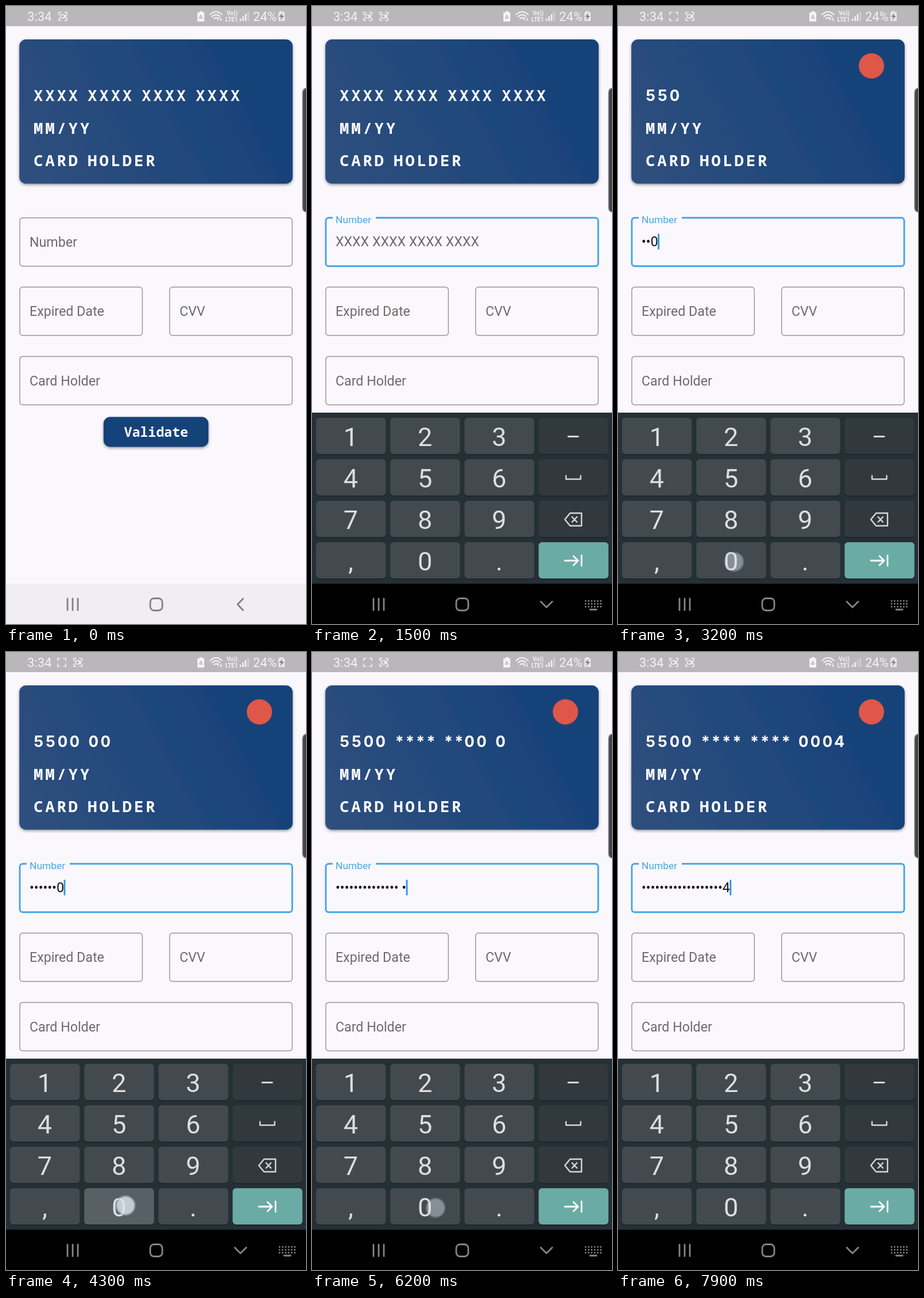
An HTML page that plays this animation: 522 by 1073 pixels, repeating every 8 s.

```html
<!DOCTYPE html>
<html lang="en">
<head>
<meta charset="utf-8">
<title>Card form</title>
<style>
  html, body { margin: 0; width: 100%; height: 100%; overflow: hidden; background: #faf8fc; }
  svg { display: block; width: 100vw; height: 100vh; }
  text { font-family: Roboto, sans-serif; font-size: 23.2px; white-space: pre; }
  .line { fill: none; stroke-linecap: round; stroke-linejoin: round; }
  .card { font: 700 27.5px "Noto Sans Mono", monospace; letter-spacing: 3.7px; word-spacing: -7px; fill: #fff; }
  .digits { font: 700 27px Inter, sans-serif; font-variant-numeric: tabular-nums; letter-spacing: 3.4px; word-spacing: 1.5px; }
  .star { letter-spacing: .8px; }
  .button { font: 700 23.2px "Noto Sans Mono", monospace; fill: #fff; }
  .status text { font-size: 22px; fill: #f3f2f4; }
  .box { fill: none; stroke: #969598; stroke-width: 1.45; }
  .hint { fill: #6b6a6d; }
  .key { font-size: 45px; fill: #dcdee0; text-anchor: middle; }
</style>
</head>
<body>
<svg viewBox="0 0 522 1073" preserveAspectRatio="none">
  <defs>
    <linearGradient id="blue" gradientUnits="userSpaceOnUse" x1="60" y1="300" x2="400" y2="110">
      <stop stop-color="#2e4f7e"/><stop offset=".5" stop-color="#23497c"/><stop offset="1" stop-color="#18427a"/>
    </linearGradient>
    <filter id="shadow" x="-10%" y="-20%" width="120%" height="150%">
      <feDropShadow dx="0" dy="2" stdDeviation="2.5" flood-opacity=".4"/>
    </filter>
    <clipPath id="aboveNav"><path d="M0 0H522V1003H0z"/></clipPath>
    <path id="brackets" class="line" stroke-width="1.7" d="M1 5V1H5M11 1H15V5M15 11V15H11M5 15H1V11"/>
    <path id="lens" class="line" stroke-width="1.6" d="M4 5H10V11H4zM10 8L13 5.5V10.5z"/>
  </defs>

  <rect width="522" height="1073" fill="#faf8fc"/>
  <rect x="23.2" y="58" width="475.6" height="250.5" rx="11.6" fill="url(#blue)" filter="url(#shadow)"/>
  <circle id="brand" cx="441" cy="104" r="22" fill="#df5748"/>
  <text id="cardNumber" class="card" x="48" y="165"></text>
  <text class="card" x="48" y="221.5">MM/YY</text>
  <text class="card" x="48" y="278">CARD HOLDER</text>

  <rect id="numberBox" class="box" x="24" y="367.7" width="474" height="84" rx="5"/>
  <rect id="notch" x="36" y="364" height="8" fill="#faf8fc"/>
  <text id="label" x="41">Number</text>
  <text id="hint" class="hint" x="41" y="416.5">XXXX XXXX XXXX XXXX</text>
  <text id="entry" x="41" y="416.5" fill="#111"></text>
  <rect id="cursor" y="395.5" width="2.9" height="27" fill="#2f96e8"/>
  <rect class="box" x="24" y="488" width="213.3" height="84" rx="5"/>
  <rect class="box" x="284.7" y="488" width="213.3" height="84" rx="5"/>
  <rect class="box" x="24" y="608.4" width="474" height="84" rx="5"/>
  <text class="hint" x="41" y="538">Expired Date</text>
  <text class="hint" x="302" y="538">CVV</text>
  <text class="hint" x="41" y="658.5">Card Holder</text>
  <rect x="169.7" y="713.5" width="182.6" height="52" rx="11.6" fill="#18427a" filter="url(#shadow)"/>
  <text class="button" x="205.5" y="748">Validate</text>

  <g class="status">
    <rect width="522" height="35" fill="#b9b7ba"/>
    <text x="37" y="26">3:34</text>
    <text x="430" y="26">24%</text>
    <g stroke="#f3f2f4">
      <g id="recorder"><use href="#brackets"/><use id="blink" href="#lens"/></g>
      <g id="recorder2" transform="translate(117 10)"><use href="#brackets"/><use href="#lens"/></g>
      <path class="line" stroke-width="2" d="M355 15Q365.500 5 376 15M358.500 18.500Q365.500 12 372 18M362 22Q365 19 368 21.500"/>
      <path class="line" stroke-width="1.200" d="M369 25V20M367.500 21.500L369 20L370.500 21.500M374 20V25M372.500 23.500L374 25L375.500 23.500"/>
      <g stroke-width="2.600">
        <path d="M408 26V22M412.500 26V18"/><path id="bar" d="M417 26V14"/>
        <path d="M421.500 26V10" opacity=".4"/>
      </g>
    </g>
    <g fill="#f3f2f4">
      <path d="M337 9H342V11H345V27H333V11H337z"/>
      <path d="M476 9H482V11H485V26H474V11H476z" opacity=".8"/>
      <text x="384" y="16" style="font-size:10px;font-weight:700">Vo))</text>
      <text x="381.500" y="26.500" style="font-size:10px;font-weight:700">LTE1</text>
    </g>
    <path class="line" stroke="#b9b7ba" stroke-width="1.500" d="M336.500 21L339 16L341.500 21z"/>
    <path d="M481 12L475 19H479L477 25L484 17H480z" fill="#858388"/>
  </g>
  <path d="M523 142.500Q516 143 516 151V350Q516 357 523 358" fill="#444345" stroke="#929094" stroke-width="1.500"/>

  <g clip-path="url(#aboveNav)"><g id="keyboard">
    <rect y="706" width="522" height="297" fill="#253036"/>
    <g id="keys"></g>
    <g class="line" stroke="#d5d8da" stroke-width="2.400">
      <path d="M446 747.500H463" stroke-width="3"/>
      <path d="M442 815.500V821.500H467.500V815.500"/>
      <path d="M440 891.500L449 880.500H469V902.500H449zM452.500 887L461 896M461 887L452.500 896"/>
      <path d="M440 963H462M455 955L463 963L455 971M469 954V972" stroke="#fff" stroke-width="2.800"/>
    </g>
  </g></g>

  <rect id="nav" y="1003" width="522" height="70"/>
  <g id="navIcons" class="line" stroke-width="2.800">
    <path d="M107 1029V1049M116 1029V1049M125 1029V1049"/>
    <rect x="251" y="1028.500" width="21" height="21" rx="6.500"/>
    <path id="back" d="M412.500 1029L403 1039L412.500 1049"/>
    <g id="hide">
      <path d="M398 1034L408 1044L418 1034"/>
      <path d="M476 1033H503M476 1038H503M476 1043H503" stroke-dasharray=".1 5.200"/>
      <path d="M484 1048H495"/>
    </g>
  </g>
  <g id="touch">
    <circle r="18" fill="#9db9d5" opacity=".35"/>
    <circle r="15.500" fill="#e4e8ec" opacity=".72" stroke="#a8c0d8" stroke-width="1.500"/>
  </g>
</svg>
<script>
const LOOP = 8000, STEP = 100, FOCUS = 600;
const $ = id => document.getElementById(id);
const set = (id, attrs) => Object.entries(attrs).forEach(([k, v]) => $(id).setAttribute(k, v));
const show = (id, on) => set(id, { visibility: on ? 'visible' : 'hidden' });
const clamp = v => Math.max(0, Math.min(1, v));
const ease = v => 1 - (1 - clamp(v)) ** 3;
const mix = (a, b, p) => a + (b - a) * p;

const digits = '55' + '0'.repeat(13) + '4';
const typedAt = [2200, 2600, ...Array.from({ length: 13 }, (_, i) => 3200 + i * 300), 7600];

const caps = ['1', '2', '3', '', '4', '5', '6', '', '7', '8', '9', '', ',', '0', '.', ''];
const keyX = i => 7 + (i % 4) * 129.1;
const keyY = i => 715 + Math.floor(i / 4) * 72;
const keyColor = i => i === 15 ? '#6aaba5' : i % 4 === 3 ? '#31393f' : '#42494f';
$('keys').innerHTML = caps.map((cap, i) => {
  const x = keyX(i), y = keyY(i);
  return `<rect x="${x}" y="${y + 1.5}" width="121.5" height="63" rx="6" fill="#1a2328"/>
    <rect id="key${i}" x="${x}" y="${y}" width="121.5" height="63" rx="6"/>
    <text class="key" x="${x + 60.5}" y="${y + 49}">${cap}</text>`;
}).join('');

const taps = [{ at: FOCUS, x: 205, y: 412 }, ...typedAt.map((at, i) => {
  const key = caps.indexOf(digits[i]);
  const x = digits[i] === '0' ? Math.min(215, 202 + (at - 3200) * .005) : keyX(key) + 66;
  return { at, key, x, y: keyY(key) + 34 };
})];

const group = s => s.replace(/(.{4})(?=.)/g, '$1 ');
const mask = s => [...s].map((c, i) => i > 4 && i < s.length - 4 && c !== ' ' ? '*' : c).join('');

// The latest inserted character stays readable; a new group reveals its space instead.
function obscure(text, count) {
  const open = text.length - (count > 4 && count % 4 === 1 ? 2 : 1);
  return [...text].map((c, i) => i === open ? c : '•').join('');
}

function drawForm(t) {
  const count = typedAt.filter(at => at <= t).length;
  const text = group(digits.slice(0, count));
  const focused = t >= FOCUS, p = ease((t - FOCUS) / 250);

  $('cardNumber').setAttribute('class', count ? 'card digits' : 'card');
  $('cardNumber').innerHTML = count
    ? mask(text).replace(/\*+/g, '<tspan class="star">$&</tspan>')
    : 'XXXX XXXX XXXX XXXX';
  show('brand', count > 1);

  $('numberBox').style.cssText = focused ? 'stroke:#45a4ea;stroke-width:2.9' : '';
  set('notch', { width: 75 * p });
  set('label', { y: mix(418, 377, p), fill: focused ? '#4ba5e6' : '#6b6a6d' });
  $('label').style.fontSize = mix(23.2, 17.4, p) + 'px';
  set('hint', { opacity: count ? 0 : p });

  $('entry').textContent = obscure(text, count);
  const since = t - (count ? typedAt[count - 1] : FOCUS);
  show('cursor', focused && since % 1000 < 500);
  set('cursor', { x: 41 + (count ? $('entry').getComputedTextLength() - .5 : 0) });
}

function drawSystem(t) {
  const rise = ease((t - FOCUS - 50) / 300), dark = t >= FOCUS + 150;
  set('keyboard', { transform: `translate(0 ${297 * (1 - rise)})` });
  set('nav', { fill: dark ? '#000' : '#f0eef2' });
  set('navIcons', { stroke: dark ? '#858585' : '#828084' });
  show('back', !dark);
  show('hide', dark);
  const second = t >= 300;
  set('recorder', { transform: `translate(${second ? 89 : 91} 10)` });
  show('recorder2', second);
  show('blink', (t + 750) % 2000 < 900);
  set('bar', { opacity: t >= 7300 ? .4 : 1 });
}

function drawTouch(t) {
  const tap = taps.find(({ at }) => t >= at - STEP && t < at + STEP);
  const pressed = tap && t < tap.at;
  show('touch', !!tap);
  if (tap) set('touch', {
    transform: `translate(${tap.x} ${tap.y + (pressed ? -4 : 0)})`,
    opacity: pressed ? 1 : .55
  });
  caps.forEach((_, i) => set('key' + i, { fill: pressed && tap.key === i ? '#596065' : keyColor(i) }));
}

const start = performance.now();
function draw() {
  const t = Math.floor((performance.now() - start) % LOOP / STEP) * STEP;
  drawForm(t);
  drawSystem(t);
  drawTouch(t);
  requestAnimationFrame(draw);
}
draw();
</script>
</body>
</html>
```
